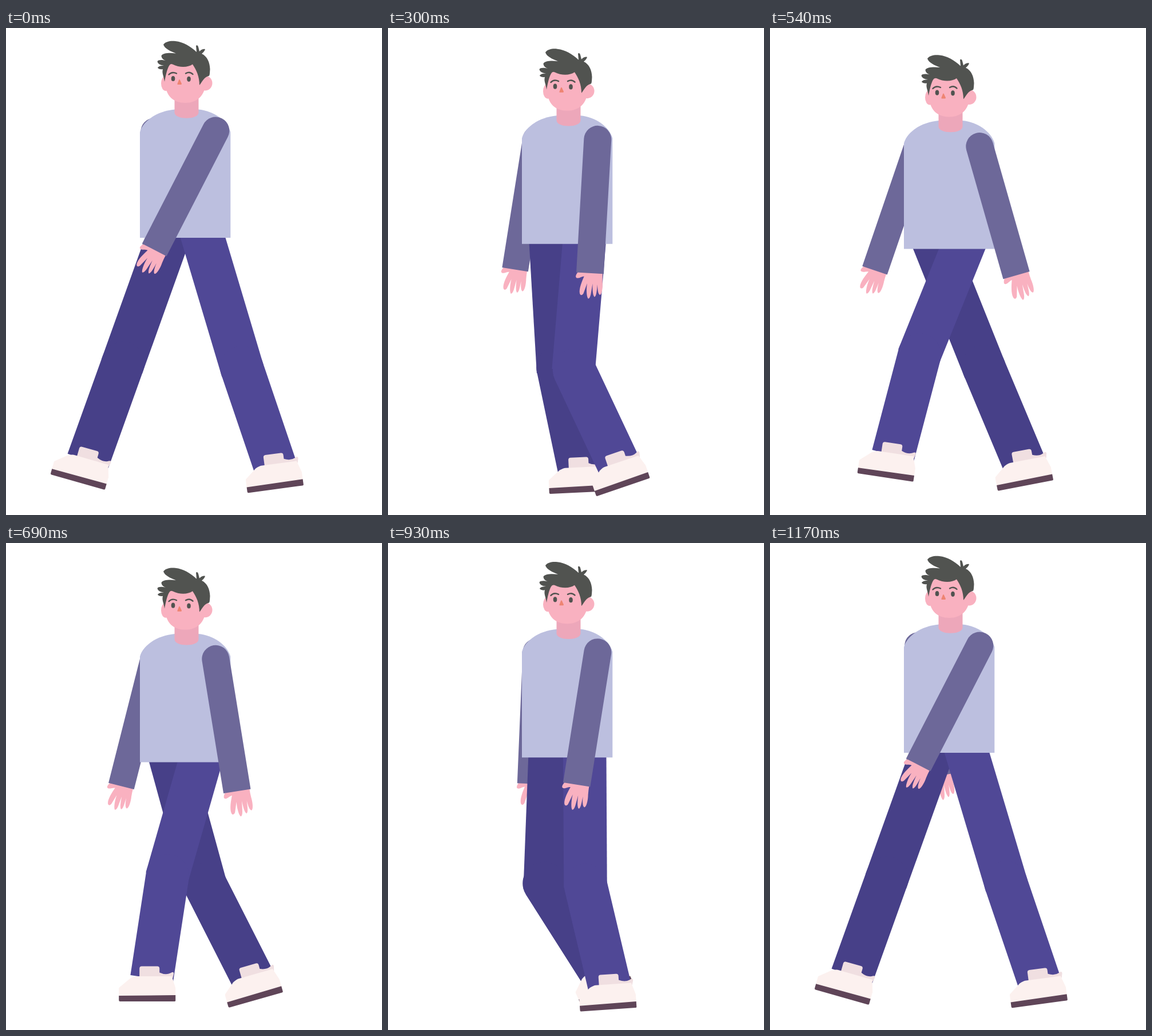
These frames come from a looping animation (657 by 852 pixels, 1200 ms). An HTML page:

```html
<!DOCTYPE html>
<html lang="en">
<head>
<meta charset="utf-8">
<title>Walk cycle</title>
<style>
  html, body { margin: 0; width: 100%; height: 100%; overflow: hidden; background: #fff; }
  svg { display: block; width: 100vw; height: 100vh; }
  .sleeve { fill: #6d6899; }
  .skin { fill: #f9b1c0; }
  .hair { fill: #515350; }
</style>
</head>
<body>
<svg viewBox="0 0 657 852" xmlns="http://www.w3.org/2000/svg">
  <defs>
    <path id="hand" class="skin" d="M-21-1C-24 3-26 8-23 9.500C-19 11-14 6-10 6C-13 14-18 28-16 36C-14.500 41-11 39-9.500 36L-4 18C-5 28-4 40-1 44.500C1.500 45 3 40 3.500 36L5.500 18C6 30 7 38 10 41C13 40 13.500 34 14 19C15 30 16.500 36 19.500 37C23 36 24 24 22.500 14C22 9 22 4 22-1Z"/>
    <path id="thigh" d="M-37.750-22H37.750V236.600H-37.750Z"/>
    <path id="shin" d="M-37.750 0A37.750 37.750 0 0 1 37.750 0V182H-37.750Z"/>
    <g id="shoe">
      <path fill="#f0dfe1" d="M-20 0V-17Q-20-21-16-21H11Q15-21 15-17V-10Q26-5 34-9Q40-13 40-8L38 0Z"/>
      <path fill="#fcf1ef" d="M-56 31V18Q-56 16-54 15L-36 0Q-29-3.500-26-3.500H36.500L43 17V30Z"/>
      <path fill="#5f4558" d="M-56 30.500L43 29.500V39Q43 40.500 41 40.500H-54Q-56 40.500-56 38.500Z"/>
    </g>
  </defs>

  <g id="armBack">
    <use href="#hand" transform="translate(14 231) scale(.96)"/>
    <path class="sleeve" d="M-9 0A23 23 0 0 1 37 0V231H-9Z"/>
  </g>

  <!-- Joints sit off the centre line of each limb. -->
  <g id="hipBack" fill="#474088">
    <use href="#thigh" x="54"/>
    <g id="kneeBack">
      <use href="#shin" x="9"/>
      <g id="ankleBack"><use href="#shoe" y="-10"/></g>
    </g>
  </g>
  <g id="hipFront" fill="#504896">
    <use href="#thigh" x="-54"/>
    <g id="kneeFront">
      <use href="#shin" x="-11"/>
      <g id="ankleFront"><use href="#shoe" y="-10"/></g>
    </g>
  </g>

  <path id="shirt" fill="#bcbfdf" d="M234 367V182C240 161 266 145 295 142.500H336C362 145 386 161 392.300 182V367Z"/>

  <g id="head">
    <path fill="#eda7ba" d="M294.500 110V148C295 161 336 161 336.500 148V110Z"/>
    <g class="skin">
      <ellipse cx="279" cy="97" rx="8" ry="13"/>
      <ellipse cx="348" cy="96.500" rx="12.500" ry="13"/>
      <path d="M277 66V93C279 120 293 131 313 131C334 131 348 118 349 95V60H285Z"/>
    </g>
    <path class="hair" d="M277 94C276 84 272 80 274 72C270 73 266 71.500 265 69.500C267 66.500 271 66 276 65.500C270 65.500 265 62.500 264.500 58.500C266 55.500 272 55.500 279 57C274 55.500 271.500 52 271.500 48.500C274 44 285 43 297 44.500C288 41 277 36 275 29C279 23 289 22 296 23C310 24.500 322 32 333 42L332 31Q335 29 336 33L338 41Q343 36 348 37Q347 41 342 45C352 50 356 60 356.500 72C356 80 356 84 354 84C346 86 343 94 338 100C338 85 333 74 326 63.500C318 69 304 70 291 63.500Q287 62 285 66C281 73 279 84 277 94Z"/>
    <path fill="none" stroke="#515350" stroke-width="2.400" stroke-linecap="round" d="M284.500 81.500Q290 75.500 298 79.500M314 79.500Q321 75.500 326.500 81"/>
    <ellipse class="hair" cx="292" cy="88.500" rx="3.300" ry="4.600"/>
    <ellipse class="hair" cx="319.500" cy="89.300" rx="3.300" ry="4.600"/>
    <path fill="#ee8472" d="M302 91Q303 89 304 91L307 97.500Q307 99 305.500 99H300.500Q299 99 299.500 97.500Z"/>
  </g>

  <g id="armFront">
    <use href="#hand" transform="translate(0 234.500)"/>
    <path class="sleeve" d="M-24 0A24 24 0 0 1 24 0V234.500H-24Z"/>
  </g>
</svg>
<script>
const LOOP = 1200, STEP = 30, TURN = 570, END = 1170;

// Key poses as [time, value]; each track closes on its first value.
// Angles in degrees: 0 hangs straight down, positive swings left.
const LEGS = {
  Front: {
    knee: [-43, 230], ankle: [-11, 192],
    hipX:  [[0, 397.7]],
    hipY:  [[0, 357.6], [TURN, 378.2]],
    thigh: [[0, -16.6], [TURN, 24.1]],
    bend:  [[0, -2.1], [300, -30], [TURN, -4.4], [930, -13]],
    foot:  [[0, -7.7], [300, -18.8], [TURN, 12], [690, 0]]
  },
  Back: {
    knee: [45, 230], ankle: [9, 192],
    hipX:  [[0, 231.2], [210, 227], [TURN, 238.5], [930, 229.2]],
    hipY:  [[0, 351.4], [210, 357.6], [TURN, 402.6], [930, 368.5]],
    thigh: [[0, 19.7], [TURN, -24.1]],
    bend:  [[0, 0], [210, -11.3], [TURN, 0], [930, -34.6]],
    foot:  [[0, 15.9], [120, -4.6], [300, -2.7], [930, -24]]
  }
};

const $ = id => document.getElementById(id);

function at(keys, t) {
  const next = keys.find(k => k[0] > t) || [END, keys[0][1]];
  const prev = keys.filter(k => k[0] <= t).pop();
  const u = next[0] > prev[0] ? (t - prev[0]) / (next[0] - prev[0]) : 1;
  return prev[1] + (next[1] - prev[1]) * u;
}

// There and back between three poses.
const swing = (a, b, c, t) =>
  t < TURN ? a + (b - a) * t / TURN : b + (c - b) * (t - TURN) / (END - TURN);

function place(id, x, y, angle = 0) {
  $(id).setAttribute("transform", `translate(${x} ${y}) rotate(${angle})`);
}

function drawLeg(side, t) {
  const leg = LEGS[side];
  const thigh = at(leg.thigh, t), bend = at(leg.bend, t);
  place("hip" + side, at(leg.hipX, t), at(leg.hipY, t), thigh);
  place("knee" + side, ...leg.knee, bend);
  place("ankle" + side, ...leg.ankle, at(leg.foot, t) - thigh - bend);
}

function draw(t) {
  const dip = swing(0, 1, 0, t), body = 20.6 * dip;
  place("shirt", 0, body);
  place("head", 0, 25.9 * dip);
  place("armBack", 244.5, 181.5 + body, swing(-3.3, 20.1, -9.4, t));
  place("armFront", 366.3, 179.6 + 29 * dip, swing(27.2, -18.3, 27.2, t));
  drawLeg("Back", t);
  drawLeg("Front", t);
}

function tick() {
  draw(Math.floor(performance.now() % LOOP / STEP) * STEP);
  requestAnimationFrame(tick);
}
tick();
</script>
</body>
</html>
```
